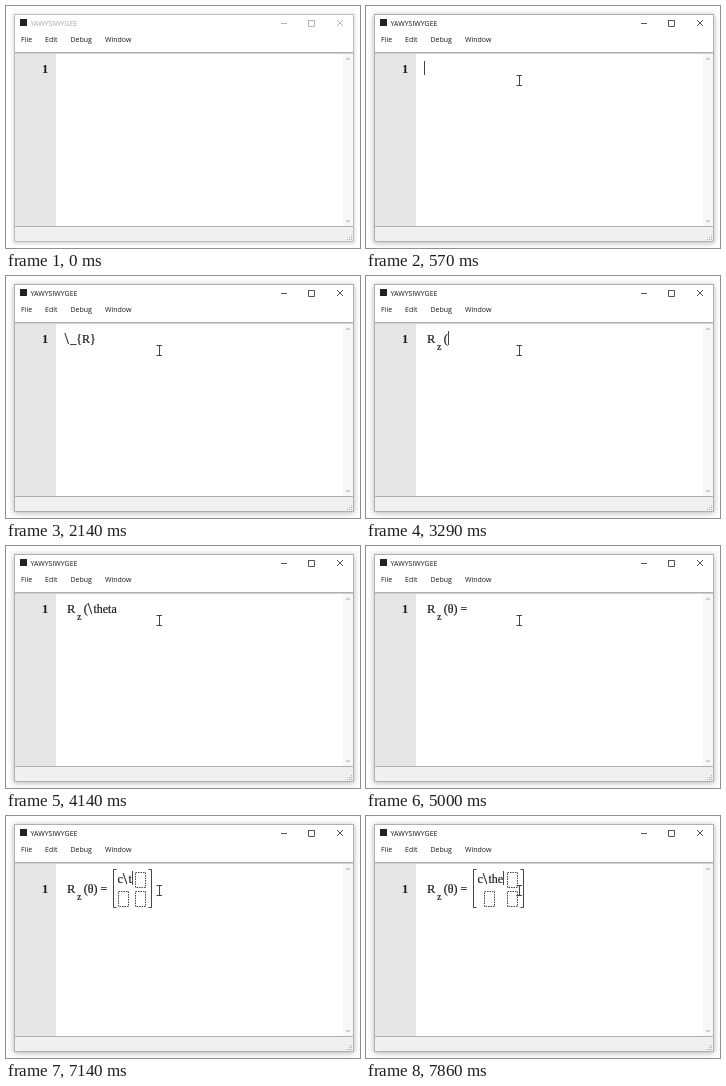
An HTML page with a canvas for the animation above (8000 ms loop, 354 by 242 pixels).

```html
<!DOCTYPE html>
<html lang="en">
<head>
<meta charset="utf-8">
<title>Equation editor</title>
<style>
html, body { margin: 0; overflow: hidden; background: #fff; }
canvas { display: block; }
</style>
</head>
<body>
<canvas id="stage" width="354" height="242"></canvas>
<script>
const ctx = document.getElementById('stage').getContext('2d');
const LOOP = 8000, INK = '#1a1a1a', SOFT_INK = '#444';
const UI = '7px "Open Sans", "Noto Sans", sans-serif';
const serif = (size, weight = '') => `${weight} ${size}px "Liberation Serif", "Noto Serif", serif`;

// Each step: start time, mode, typed text, caret shown
const steps = [
  [0, 'raw', '', 0], [430, 'raw', '', 1], [1000, 'raw', '', 0],
  [1290, 'raw', '\\', 1], [1430, 'raw', '\\_', 1], [1570, 'raw', '\\_{', 1],
  [1860, 'raw', '\\_{R', 1], [2000, 'raw', '\\_{R}', 1], [2140, 'raw', '\\_{R}', 0],
  [2290, 'raw', '\\_{R}{', 1], [2430, 'raw', '\\_{R}{z', 1], [2710, 'raw', '\\_{R}{z}', 1],
  [3000, 'math', '', 1], [3140, 'math', '(', 0], [3290, 'math', '(', 1],
  [3430, 'math', '(\\', 1], [3570, 'math', '(\\t', 1], [3710, 'math', '(\\th', 1],
  [3860, 'math', '(\\the', 1], [4000, 'math', '(\\theta', 1], [4140, 'math', '(\\theta', 0],
  [4290, 'math', '(θ', 1], [4430, 'math', '(θ)', 1], [4570, 'math', '(θ) ', 1],
  [4710, 'math', '(θ) =', 1], [5000, 'math', '(θ) =', 0],
  [5430, 'command', '\\m', 1], [5570, 'command', '\\mat', 1], [5860, 'command', '\\mat{', 1],
  [6000, 'command', '\\mat{2', 1], [6140, 'command', '\\mat{2}', 1],
  [6290, 'command', '\\mat{2}{', 1], [6430, 'command', '\\mat{2}{', 0],
  [6570, 'command', '\\mat{2}{2', 1], [6710, 'command', '\\mat{2}{2}', 1],
  [6860, 'matrix', '', 1], [7000, 'matrix', 'c', 1], [7140, 'matrix', 'c\\t', 1],
  [7290, 'matrix', 'c\\th', 1], [7570, 'matrix', 'c\\th', 0], [7860, 'matrix', 'c\\the', 1]
];

function rect(x, y, w, h, color) {
  ctx.fillStyle = color;
  ctx.fillRect(x, y, w, h);
}

function label(text, x, y, font, color = INK) {
  ctx.font = font;
  ctx.fillStyle = color;
  ctx.fillText(text, x, y);
}

// Slightly heavier serif text
function glyph(text, x, y, size) {
  label(text, x, y, serif(size));
  ctx.strokeStyle = INK;
  ctx.lineWidth = 0.2;
  ctx.strokeText(text, x, y);
}

function path(color, ...lines) {
  ctx.strokeStyle = color;
  ctx.lineWidth = 1;
  ctx.beginPath();
  for (const line of lines)
    for (let i = 0; i < line.length; i += 2)
      ctx[i ? 'lineTo' : 'moveTo'](line[i], line[i + 1]);
  ctx.stroke();
}

// Sets a run of text and returns its right edge; backslashes are taller
function run(text, x, y) {
  for (const ch of text) {
    const slash = ch === '\\';
    glyph(ch, x, y + (slash ? 1 : 0), slash ? 16 : 12);
    x += ctx.measureText(ch).width + (slash ? 1.2 : 0);
  }
  return x;
}

function caret(x, y) {
  rect(Math.floor(x + 0.4), y - 12, 1, 14, SOFT_INK);
}

function slot(x, y) {
  ctx.setLineDash([1.5, 1]);
  ctx.strokeStyle = SOFT_INK;
  ctx.lineWidth = 1;
  ctx.strokeRect(Math.floor(x) + 0.5, y + 0.5, 10, 15);
  ctx.setLineDash([]);
}

function matrix(text, caretOn) {
  const left = 111;
  let end = left;
  if (text) end = run(text, left + 0.5, 67);
  else slot(left, 56);
  const width = Math.max(12, end - left + 1);
  const second = left + width + 3;
  const right = Math.floor(second + 16) + 0.5;
  slot(second, 56);
  slot(left + (width - 10) / 2 - 1, 75);
  slot(second, 75);
  path(SOFT_INK, [110.5, 53.5, 107.5, 53.5, 107.5, 91.5, 110.5, 91.5],
    [right - 3, 53.5, right, 53.5, right, 91.5, right - 3, 91.5]);
  if (caretOn) caret(end, 67);
}

function equation([, mode, text, caretOn]) {
  const y = mode === 'matrix' ? 77 : 67;
  label('1', 36, y, serif(12.5, 'bold'));
  let end;
  if (mode === 'raw') end = run(text, 58.5, y);
  else {
    glyph('R', 61, y, 12.5);
    glyph('z', 71, y + 7, 10);
    if (mode === 'math') end = run(text, 77.8, y);
    else {
      run('(θ) =', 77.8, y);
      if (mode === 'matrix') return matrix(text, caretOn);
      end = run(text, 105.5, y);
    }
  }
  if (caretOn) caret(end, y);
}

function frame(active) {
  const ink = active ? INK : '#aaa';
  const buttons = active ? '#555' : '#b4b4b4';
  rect(0, 0, 354, 242, '#fff');
  ctx.shadowColor = active ? 'rgba(0,0,0,.3)' : 'rgba(0,0,0,.22)';
  ctx.shadowBlur = active ? 6 : 4;
  ctx.shadowOffsetY = 1;
  rect(8, 8, 340, 228, active ? '#b0b0b0' : '#bcbcbc');
  ctx.shadowColor = 'transparent';
  rect(9, 9, 338, 226, '#fff');

  rect(14, 13, 7, 7, '#222');
  label('YAWYSIWYGEE', 24.5, 20, UI, ink);
  path(buttons, [275, 17.5, 281, 17.5],
    [302.5, 14.5, 308.5, 14.5, 308.5, 20.5, 302.5, 20.5, 302.5, 14],
    [331, 14, 337, 20], [337, 14, 331, 20]);
  [['File', 15], ['Edit', 39], ['Debug', 64.5], ['Window', 99]]
    .forEach(([name, x]) => label(name, x, 36, UI));

  rect(9, 47, 41, 173, '#e6e6e6');
  rect(337, 47, 10, 173, '#f7f7f7');
  rect(9, 221, 338, 14, '#f0f0f0');
  path('#b0b0b0', [8, 46.5, 347, 46.5], [8, 220.5, 347, 220.5]);
  path('#d0d0d0', [9, 47.5, 347, 47.5]);
  path('#aaa', [340, 54, 342, 52, 344, 54], [340, 214, 342, 216, 344, 214]);
  for (let i = 0; i < 3; i++)
    for (let j = 0; j <= i; j++) rect(345 - 2 * j, 229 + 2 * i, 1, 1, '#aaa');
}

function pointer() {
  path(SOFT_INK, [150.5, 69.5, 156, 69.5], [153.5, 69, 153.5, 80], [150.5, 79.5, 156, 79.5]);
}

function draw(now) {
  const t = now % LOOP;
  const active = t >= 290;
  frame(active);
  equation(steps.findLast(step => step[0] <= t));
  if (active) pointer();
  requestAnimationFrame(draw);
}
requestAnimationFrame(draw);
</script>
</body>
</html>
```
